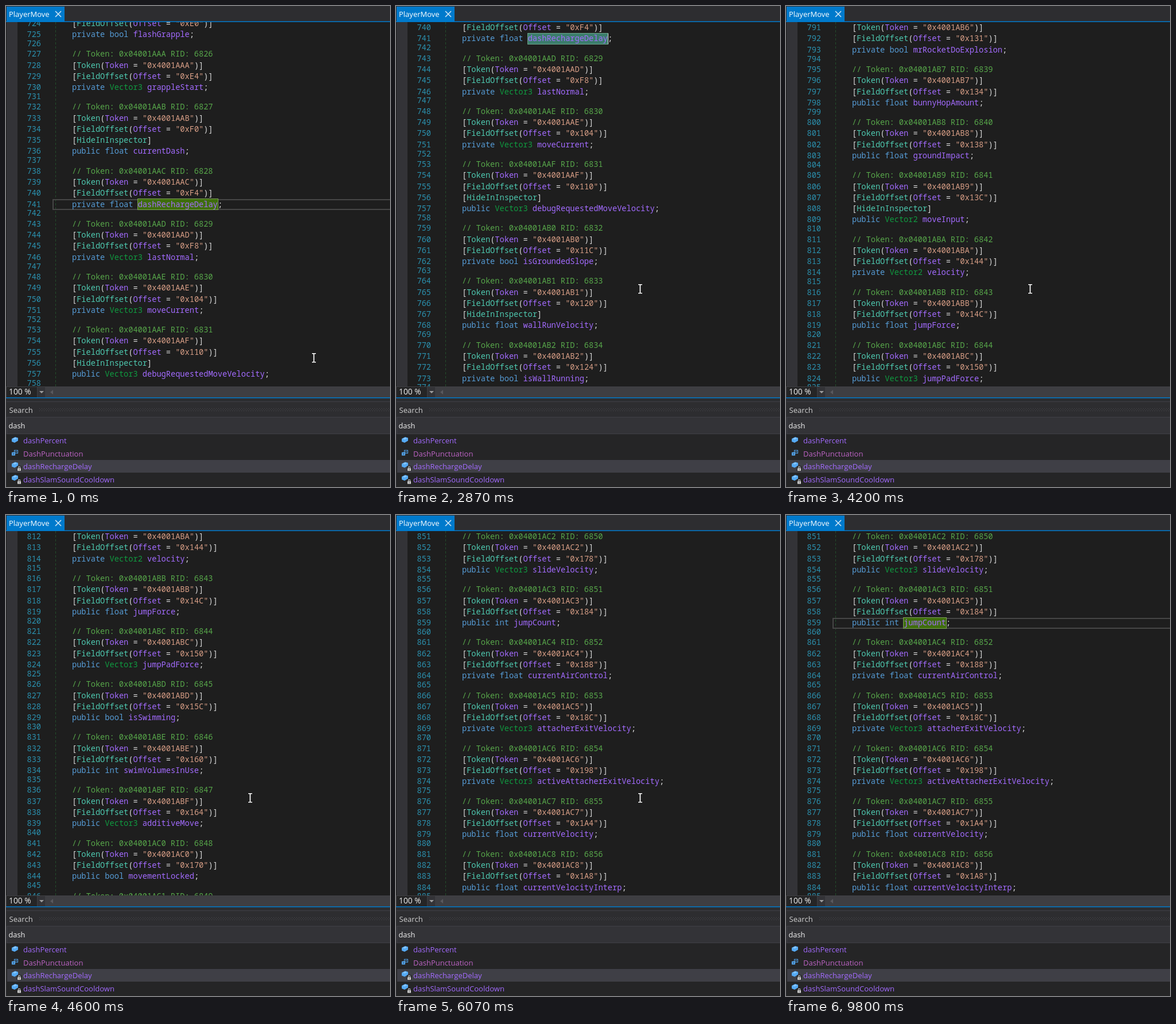
An HTML page with a canvas for the animation above (9940 ms loop, 669 by 837 pixels).

```html
<!DOCTYPE html>
<html lang="en">
<head>
<meta charset="utf-8">
<title>Code viewer</title>
<style>
  html, body { margin: 0; width: 100%; height: 100%; overflow: hidden; background: #2d2d30; }
  canvas { display: block; width: 669px; height: 837px; }
</style>
</head>
<body>
<canvas id="stage"></canvas>
<script>
const W = 669, H = 837, LOOP = 9940, TICK = 200 / 3;
const TOP = 28, BOTTOM = 662, CODE_X = 115, NUM_X = 36.5, CHAR = 8.19;
const LINE = 19.25, BLANK = 15.1, FIRST = 722, START_LINE = 725, NOTCH = 3;
const CLICK = 470, JUMP = 2330, PICK = 7130, BLINK = 532;
const MONO = '13.65px "Noto Sans Mono", "DejaVu Sans Mono", monospace';
const ui = size => `${size}px "Open Sans", "Noto Sans", sans-serif`;
const C = {
  bg: '#1e1e1e', panel: '#2d2d30', list: '#252526', edge: '#3f3f46', input: '#333337', blue: '#007acc',
  punct: '#dcdcdc', word: '#569cd6', struct: '#109a40', attr: '#4ec9b0', field: '#a36bff',
  text: '#d69d85', note: '#57a64a', num: '#2b91af', icon: '#55aaf5', light: '#d0d0d0'
};

// a leading * adds [HideInInspector]
const FIELDS = `private bool flashGrapple
private Vector3 grappleStart
*public float currentDash
private float dashRechargeDelay
private Vector3 lastNormal
private Vector3 moveCurrent
*public Vector3 debugRequestedMoveVelocity
private bool isGroundedSlope
*public float wallRunVelocity
private bool isWallRunning
private float stuckCheck
private float explosionVelocityResolveSpeed
private bool doLandSound
private bool mrRocketDoExplosion
public float bunnyHopAmount
public float groundImpact
*public Vector2 moveInput
private Vector2 velocity
public float jumpForce
public Vector3 jumpPadForce
public bool isSwimming
public int swimVolumesInUse
public Vector3 additiveMove
public bool movementLocked
public float slideTime
public Vector3 slideVelocity
public int jumpCount
private float currentAirControl
private Vector3 attacherExitVelocity
private Vector3 activeAttacherExitVelocity
public float currentVelocity
public float currentVelocityInterp`.split('\n');
const SIZE = { bool: 1, int: 4, float: 4, Vector2: 8, Vector3: 12 };
const hex = n => n.toString(16).toUpperCase();

const rows = [];
const rowAt = n => rows[n - FIRST];
function addRow(...parts) {
  const last = rows[rows.length - 1];
  rows.push({ n: FIRST + rows.length, parts, y: last ? last.y + (last.parts.length ? LINE : BLANK) : 0 });
}
function attribute(name, key, value) {
  addRow(['[', C.punct], [name, C.attr], ['(', C.punct], [key, C.field],
    [' = ', C.punct], [`"0x${value}"`, C.text], [')]', C.punct]);
}
let offset = 0xE0;
FIELDS.forEach((entry, i) => {
  const [access, type, name] = entry.replace('*', '').split(' ');
  const token = hex(0x4001AA9 + i);
  // everything but a bool is aligned to four bytes
  if (type !== 'bool') offset = Math.ceil(offset / 4) * 4;
  addRow([`// Token: 0x0${token} RID: ${6825 + i}`, C.note]);
  attribute('Token', 'Token', token);
  attribute('FieldOffset', 'Offset', hex(offset));
  if (entry[0] === '*') addRow(['[', C.punct], ['HideInInspector', C.attr], [']', C.punct]);
  addRow([access + ' ', C.word], [type + ' ', type.startsWith('Vector') ? C.struct : C.word],
    [name, C.field], [';', C.punct]);
  addRow();
  offset += SIZE[type];
});

// wheel gestures: start, end, first visible line reached
const SCROLL = [
  [2400, 3130, 749], [3330, 3400, 752], [3530, 3800, 779], [3870, 3930, 782], [4070, 4200, 791],
  [4330, 4600, 812], [4870, 5000, 821], [5200, 5470, 836], [5600, 5800, 848], [6000, 6070, 851]
];

// pointer moves: start, end, x, y reached
const MOVES = [
  [0, 530, 325, 347], [800, 1200, 502, 490], [1400, 1800, 131, 813], [1800, 2070, 120, 806],
  [2200, 2470, 425, 492], [6330, 6400, 415, 459], [6530, 7070, 250, 188], [7330, 7730, 108, 532]
];

const canvas = document.getElementById('stage');
const dpr = window.devicePixelRatio || 1;
canvas.width = W * dpr;
canvas.height = H * dpr;
const ctx = canvas.getContext('2d');

function box(x, y, w, h, color) {
  ctx.fillStyle = color;
  ctx.fillRect(x, y, w, h);
}
function frame(x, y, w, h, color, weight) {
  ctx.strokeStyle = color;
  ctx.lineWidth = weight;
  ctx.strokeRect(x, y, w, h);
}
function label(text, x, y, color, font) {
  ctx.font = font;
  ctx.fillStyle = color;
  ctx.fillText(text, x, y);
}
function shape(points, color) {
  ctx.beginPath();
  points.forEach(([x, y]) => ctx.lineTo(x, y));
  ctx.closePath();
  ctx.fillStyle = color;
  ctx.fill();
}

const progress = (t, start, end) => Math.min(1, (t - start) / (end - start));

function firstLineAt(t) {
  let line = START_LINE;
  for (const [start, end, to] of SCROLL) {
    if (t < start) break;
    line += NOTCH * Math.floor((to - line) / NOTCH * progress(t, start, end) + 1e-6);
  }
  return line;
}

function pointerAt(t) {
  let x = 536, y = 612;
  for (const [start, end, toX, toY] of MOVES) {
    if (t < start) break;
    const p = progress(t, start, end), ease = p * p * (3 - 2 * p);
    x += (toX - x) * ease;
    y += (toY - y) * ease;
  }
  return [Math.round(x), Math.round(y)];
}

function drawRow(row, y) {
  label(row.n, NUM_X, y + (row.parts.length ? 14.2 : 10.8), C.num, MONO);
  let col = 0;
  for (const [text, color] of row.parts) {
    label(text, CODE_X + col * CHAR, y + 14.2, color, MONO);
    col += text.length;
  }
}

function drawMark(y, col, length, selected) {
  if (!selected) frame(82, y + 2, W, 17, '#464646', 2);
  const x = Math.round(CODE_X + col * CHAR) - 0.5, w = Math.round(length * CHAR) + 1;
  box(x, y, w, LINE, selected ? '#3b7d6c' : '#3f6e0c');
  frame(x, y + 0.5, w, 19, selected ? '#6fa58c' : '#7c9f58', 1);
}

function drawCaret(t, since, y, col) {
  if (t >= since && Math.floor((t - since) / BLINK) % 2 === 0) {
    box(Math.round(CODE_X + col * CHAR), y + 1, 1, 18, C.punct);
  }
}

function drawEditor(t) {
  const first = firstLineAt(t), ahead = firstLineAt(t + 70);
  const top = rowAt(first).y - (first === START_LINE ? 11.8 : 0);
  const place = n => rowAt(n).y - top + TOP;
  ctx.save();
  ctx.beginPath();
  ctx.rect(0, TOP, W, BOTTOM - TOP);
  ctx.clip();
  box(0, TOP, W, BOTTOM - TOP, C.bg);
  box(1, TOP, 19, BOTTOM - TOP, C.input);

  ctx.setLineDash([4, 3]);
  ctx.strokeStyle = '#234d2b';
  ctx.lineWidth = 1;
  ctx.beginPath();
  ctx.moveTo(86.5, TOP);
  ctx.lineTo(86.5, BOTTOM);
  ctx.stroke();
  ctx.setLineDash([]);

  const dashY = Math.round(place(741)), jumpY = Math.round(place(859));
  if (t < PICK) drawMark(dashY, 14, 17, t >= JUMP);
  else drawMark(jumpY, 11, 9, false);

  for (const row of rows) {
    const y = place(row.n);
    if (y < TOP - LINE || y > BOTTOM || (ahead !== first && row.n <= first)) continue;
    drawRow(row, y);
  }
  // while scrolling, the top row repaints before the rest
  if (ahead !== first) drawRow(rowAt(ahead), TOP);

  if (t < JUMP) drawCaret(t, CLICK, dashY, 25);
  else if (t < PICK) drawCaret(t, JUMP + BLINK, dashY, 31);
  else drawCaret(t, PICK, jumpY, 16);
  ctx.restore();
}

function drawCube(x, y) {
  shape([[x, y + 3], [x + 6, y], [x + 11, y + 1.5], [x + 11, y + 6.5], [x + 5, y + 10], [x, y + 8]], C.icon);
  shape([[x + 1.5, y + 3.2], [x + 6, y + 1], [x + 9.5, y + 2], [x + 5, y + 4.4]], '#8cc8fa');
}
function drawLock(x, y) {
  box(x - 1, y - 1, 8, 9, C.list);
  frame(x + 1.5, y + 0.5, 3, 4, C.light, 1);
  box(x, y + 3, 6, 4.5, C.light);
  box(x + 2.5, y + 4.5, 1, 1.5, C.list);
}
function drawEnum(x, y) {
  frame(x + 4.5, y + 0.5, 6, 5, C.icon, 1);
  box(x + 6, y + 2.5, 3, 1, C.icon);
  box(x, y + 4, 6, 5.5, C.icon);
  box(x + 1.5, y + 6.3, 3, 1, C.list);
}

function drawChrome() {
  box(0, 0, W, TOP, C.panel);
  box(0, 26.5, W, 1.5, C.blue);
  box(1, 1, 101, 26, C.blue);
  label('PlayerMove', 5, 19, '#ffffff', ui(13));
  ctx.strokeStyle = '#d0e6f5';
  ctx.lineWidth = 1.6;
  ctx.beginPath();
  ctx.moveTo(86, 9); ctx.lineTo(96, 19);
  ctx.moveTo(96, 9); ctx.lineTo(86, 19);
  ctx.stroke();

  box(0, 662, W, 19, '#3e3e42');
  box(1, 663, 53, 18, C.list);
  box(55, 663, 13, 18, C.input);
  label('100 %', 5, 676, '#f1f1f1', ui(13.8));
  shape([[58, 670], [66, 670], [62, 674]], '#a0a0a0');
  shape([[82, 668], [82, 676], [77, 672]], '#59595e');

  box(0, 681, W, H - 681, C.panel);
  box(0, 681, W, 1.5, C.blue);
  box(1, 688, W, 1, C.edge);
  label('Search', 5.5, 708, C.light, ui(13.1));
  for (let x = 58; x < W; x += 4) {
    for (let i = 0; i < 3; i++) box(x + (i % 2) * 2, 700 + i * 2, 1, 1, '#4a4a4e');
  }
  box(1, 715, W, 30, C.edge);
  box(2, 716, W, 28, C.input);
  label('dash', 4.5, 735, '#f1f1f1', ui(12.8));

  box(1, 745, W, H - 745, C.list);
  box(2, 790, W, 22, C.edge);
  ['dashPercent', 'DashPunctuation', 'dashRechargeDelay', 'dashSlamSoundCooldown'].forEach((name, i) => {
    const y = 756 + i * 22.7, isEnum = i === 1, isPrivate = i > 1;
    if (isEnum) drawEnum(10, y - 6);
    else drawCube(10, y - (isPrivate ? 8 : 6));
    if (isPrivate) drawLock(20, y);
    label(name, 30, y + 5, isEnum ? '#bd63c5' : C.field, ui(13));
  });
}

function drawArrow() {
  shape([[0, 0], [0, 16], [3.8, 12.6], [6.4, 18.6], [9, 17.5], [6.5, 11.6], [11.6, 11.6]], '#ffffff');
  ctx.strokeStyle = '#000000';
  ctx.lineWidth = 0.9;
  ctx.stroke();
}
function drawBeam() {
  const bars = [[-3, -8, 7, 1.5], [-0.5, -8, 1.8, 16], [-3, 7, 7, 1.5]];
  bars.forEach(([x, y, w, h]) => box(x - 0.7, y - 0.7, w + 1.4, h + 1.4, 'rgba(0,0,0,.55)'));
  bars.forEach(bar => box(...bar, '#ffffff'));
}
function drawPointer(t) {
  if (t > MOVES[MOVES.length - 1][1]) return;
  const [x, y] = pointerAt(t);
  ctx.save();
  ctx.translate(x, y);
  if (y > BOTTOM) drawArrow();
  else drawBeam();
  ctx.restore();
}

const start = performance.now();
function draw() {
  const raw = (performance.now() - start) % LOOP;
  // the picture moves on 15 times a second
  const t = Math.round(Math.floor((raw + 5) / TICK) * TICK / 10) * 10;
  ctx.setTransform(dpr, 0, 0, dpr, 0, 0);
  drawEditor(t);
  drawChrome();
  drawPointer(t);
  requestAnimationFrame(draw);
}
draw();
</script>
</body>
</html>
```
